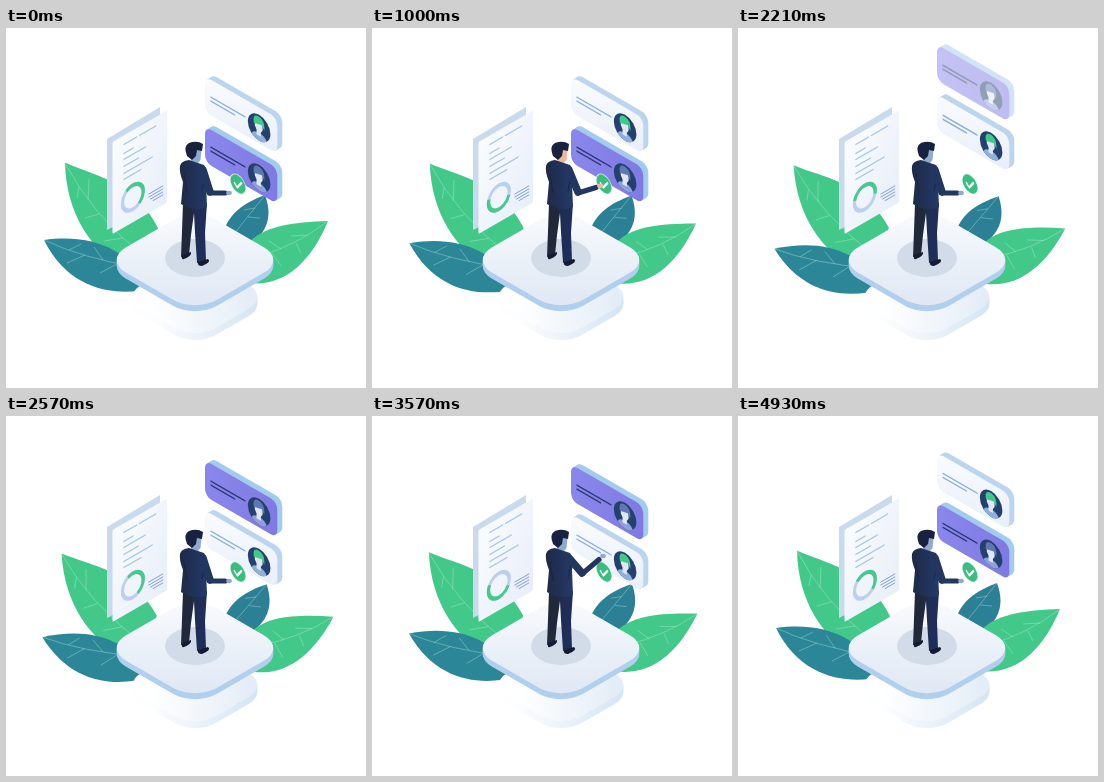
Write an HTML page that moves like this. It is 360x360 px and loops after 5000 ms.

```html
<!DOCTYPE html>
<html lang="en">
<head>
<meta charset="utf-8">
<title>Choosing a profile</title>
<style>
  html, body { margin: 0; width: 100%; height: 100%; overflow: hidden; background: #fff; }
  svg { display: block; width: 100vw; height: 100vh; }
  .vein { fill: none; stroke: #c9ecdf; stroke-width: .6; opacity: .6; }
  .line { fill: none; stroke-linecap: round; stroke-linejoin: round; }
</style>
</head>
<body>
<svg viewBox="0 0 360 360">
  <defs>
    <linearGradient id="top" x1="0" y1="0" x2="1" y2="1">
      <stop offset="0" stop-color="#fafcfe"/><stop offset="1" stop-color="#dde6f3"/>
    </linearGradient>
    <linearGradient id="base" x1="0" y1="1" x2="1" y2="0">
      <stop offset=".2" stop-color="#fff"/><stop offset="1" stop-color="#dfeaf6"/>
    </linearGradient>
    <linearGradient id="rim" x1="0" y1="1" x2="1" y2="0">
      <stop offset=".2" stop-color="#fdfeff"/><stop offset="1" stop-color="#d0e1f3"/>
    </linearGradient>
    <linearGradient id="white" x1="0" y1="0" x2="1" y2="1">
      <stop offset="0" stop-color="#fafcfe"/><stop offset="1" stop-color="#e8eef8"/>
    </linearGradient>
    <linearGradient id="purple" x1="0" y1="0" x2="1" y2="0">
      <stop offset="0" stop-color="#8a87ec"/><stop offset="1" stop-color="#7f7ae2"/>
    </linearGradient>
    <linearGradient id="jacket">
      <stop offset="0" stop-color="#1e2945"/><stop offset="1" stop-color="#243a6b"/>
    </linearGradient>
    <linearGradient id="trousers">
      <stop offset=".35" stop-color="#20283a"/><stop offset=".65" stop-color="#1f2e58"/>
    </linearGradient>
    <clipPath id="round"><circle r="13"/></clipPath>
  </defs>

  <g id="leafGreenL">
    <path fill="#42c98a" d="M59 134.5C88 148 129 153 152 200L142 240L114 237C86 222 60 186 59 134.5Z"/>
    <path class="vein" d="M59 135Q85 185 135 226M73 159L71 170M82 172L83 151M93 186L79 190M106 199L108 174M117 210L98 213"/>
  </g>
  <g id="leafBlueL">
    <path fill="#2b8798" d="M38 212C82 206 122 218 144 261C110 268 64 264 38 212Z"/>
    <path class="vein" d="M38 212Q76 230 135 240M63 222L75 216M79 227L61 235M97 232L88 219M111 236L94 245"/>
  </g>
  <g id="leafBlueR">
    <path fill="#2b8096" d="M259 167C238 175 223 185 217 205L238 222L250 212C264 198 265 184 259 167Z"/>
    <path class="vein" d="M259 167Q243 187 228 206M249 180L238 182M242 189L254 190"/>
  </g>
  <g id="leafGreenR">
    <path fill="#42c98a" d="M322 193C288 194 255 198 241 217L240 255C278 260 305 234 322 193Z"/>
    <path class="vein" d="M322 193Q290 218 250 229M302 207L285 208M290 215L295 225M275 221L263 213M266 225L275 238"/>
  </g>

  <g id="stand"></g>
  <ellipse cx="189" cy="230" rx="30" ry="19" fill="#d2dce9"/>
  <g id="cards"></g>

  <path fill="#c9daec" d="M101 111L154 79L160 81.5V171L101 202Z"/>
  <path fill="#fff" d="M154 78L161 78V83L154 87Z"/>
  <g transform="matrix(.866 -.5 0 1 106.5 114)">
    <rect width="63" height="92" rx="1.5" fill="url(#white)"/>
    <path class="line" stroke="#abc9e6" stroke-width="1.3"
      d="M13 9H28M31 9H50M13 18H24M13 24H38M13 31H30M13 38H46M13 44H33"/>
    <path class="line" stroke="#7f9fd4" stroke-width="1.2" d="M42 73H58M42 76H58M44 79H58M47 82H58"/>
    <circle cx="23.5" cy="67" r="12" fill="none" stroke="#bad0ee" stroke-width="3.8"/>
    <circle id="arc" cx="23.5" cy="67" r="12" fill="none" stroke="#45ca8b" stroke-width="3.8"
      pathLength="100" stroke-dasharray="50 50"/>
  </g>

  <g transform="matrix(.866 .5 0 1 232 156)">
    <circle r="9.4" fill="#d9f3e8"/>
    <circle r="8.6" fill="#3bbd82"/>
    <path class="line" stroke="#fff" stroke-width="2" d="M-4 1L-1 4L4 -3"/>
  </g>

  <path fill="url(#trousers)" d="M177 175H201L199 205L200 233L191 235L189 204L188 185L185 207L183 227L175 229L176 203Z"/>
  <path fill="#151b33" d="M176 227L185 224Q186 228 178 231Q175 232 176 227ZM192 234L202 231Q206 234 196 238Q191 238 192 234Z"/>
  <path class="skin" d="M186 122H195.500L194.500 132L192 135L185 134Z"/>
  <path fill="#18223f" d="M181 128Q177 118 183 115Q191 112 197 116L196 123L191 122L190 128L186 132Z"/>
  <path fill="url(#jacket)" d="M183 132Q175 133 174 138Q173 144 177 154L175 176Q188 184 201 179L200 154Q203 143 198 137Z"/>
  <path class="line" stroke="#18223f" stroke-width=".8" d="M178 146L181 165M199 148L196 163"/>
  <path id="upperArm" class="line" stroke="#22365f" stroke-width="7.500"/>
  <path id="foreArm" class="line" stroke="#22365f" stroke-width="5.200"/>
  <ellipse id="hand" class="skin" rx="2.800" ry="2.200"/>
</svg>

<script>
const LOOP = 5000, HALF = 2500, DROP_START = 2070, DROP_TIME = 700;
const byId = id => document.getElementById(id);
const clamp = x => Math.max(0, Math.min(1, x));
const smooth = x => (1 - Math.cos(Math.PI * clamp(x))) / 2;

// Rounded square lying on the floor
function slab(y, size, radius, depth, fill, side) {
  const layer = (dy, color) =>
    `<rect x="${-size / 2}" y="${-size / 2}" width="${size}" height="${size}" rx="${radius}"
      fill="${color}" transform="matrix(.866 .5 -.866 .5 189 ${y + dy})"/>`;
  let out = '';
  for (let dy = depth; dy > 0; dy--) out += layer(dy, side);
  return out + layer(0, fill);
}
byId('stand').innerHTML =
  slab(269, 86, 24, 7, 'url(#base)', 'url(#rim)') + slab(232, 105, 25, 6, 'url(#top)', '#b1cfee');

function cardMarkup(fill, side, ink, bust, hair) {
  const face = (x, y, color) =>
    `<rect width="83.5" height="36" rx="7.5" fill="${color}" transform="matrix(.866 .5 0 1 ${x} ${y})"/>`;
  let edge = '';
  for (let i = 5; i > 0; i--) edge += face(199 + i, 48.3 - i * .6, side);
  return edge + face(199, 48.3, fill) + `
    <g transform="matrix(.866 .5 0 1 199 48.3)">
      <path class="line" stroke="${ink}" stroke-width="1.6" d="M7 17.5H46M7 21.5H34"/>
      <g transform="translate(62.5 20.2)">
        <circle r="13" fill="#24406f"/>
        <g clip-path="url(#round)">
          <path fill="${bust}" d="M-10 14Q-9 5 0 5Q9 5 10 14Z"/>
          <path fill="#dfe7f3" d="M-5 -6H4V1L2 4V8H-3V3L-5 0Z"/>
          <path fill="${hair}" d="M-6 -2Q-8 -11 0 -11Q7 -10 6 0L3 -4Z"/>
        </g>
      </g>
    </g>`;
}

const cards = ['purple', 'white'].map(name => {
  const g = document.createElementNS('http://www.w3.org/2000/svg', 'g');
  g.innerHTML = name === 'purple'
    ? cardMarkup('url(#purple)', '#a3cbee', '#2b3674', '#8f9fdc', '#5f78b4')
    : cardMarkup('url(#white)', '#bcd5ef', '#8db0de', '#8db0de', '#42c98a');
  byId('cards').append(g);
  return g;
});

function place(card, x, y, opacity) {
  card.setAttribute('transform', `translate(${x} ${y})`);
  card.setAttribute('opacity', opacity);
}

function drawCards(t) {
  const turn = t < DROP_START + DROP_TIME ? 0 : 1;
  const h = t - HALF * turn;
  const leaving = cards[turn], staying = cards[1 - turn];
  const drop = clamp((h - DROP_START) / DROP_TIME);
  const y = 50 * (1 - (1 - drop) ** 2);
  place(staying, 0, y, 1);
  if (drop > 0) {
    place(leaving, 0, y - 50, clamp(drop * 2.5));
  } else {
    const p = clamp((h - 1085) / 700);
    const x = 95 * smooth(p) * (turn ? 1 : -1);
    place(leaving, x, 50 + x * .59, 1 - p * p);
  }
}

// Elbow x, y and hand x, y
const REST = [205, 165, 223, 165], PRESS = [207, 165, 228, 158], RAISE = [211, 158, 231, 140];

function drawArm(t) {
  const press = smooth((t - 650) / 300) - smooth((t - 1800) / 400);
  const raise = smooth((t - 3130) / 350) - smooth((t - 3600) / 400);
  const [ex, ey, hx, hy] = REST.map((v, i) => v + (PRESS[i] - v) * press + (RAISE[i] - v) * raise);
  byId('upperArm').setAttribute('d', `M197 142L${ex - 1} ${ey - 1}`);
  byId('foreArm').setAttribute('d', `M${ex - 1} ${ey}L${hx - 4} ${hy + (ey - hy) * .2}`);
  byId('hand').setAttribute('cx', hx);
  byId('hand').setAttribute('cy', hy);
  const skin = press > .5 ? '#f0b79c' : '#8fa9cf';
  document.querySelectorAll('.skin').forEach(part => part.setAttribute('fill', skin));
}

// Id, sway angle and pivot
const leaves = [
  ['leafGreenL', -2, 140, 235], ['leafBlueL', -5, 142, 235],
  ['leafBlueR', 2, 225, 215], ['leafGreenR', 5.5, 245, 254]
];

function draw(t) {
  const sway = (1 - Math.cos(2 * Math.PI * t / LOOP)) / 2;
  for (const [id, angle, x, y] of leaves)
    byId(id).setAttribute('transform', `rotate(${angle * sway} ${x} ${y})`);
  byId('arc').setAttribute('transform', `rotate(${t / HALF * 360 - 128} 23.5 67)`);
  drawCards(t);
  drawArm(t);
}

const start = performance.now();
function tick() {
  draw((performance.now() - start) % LOOP);
  requestAnimationFrame(tick);
}
tick();
</script>
</body>
</html>
```
